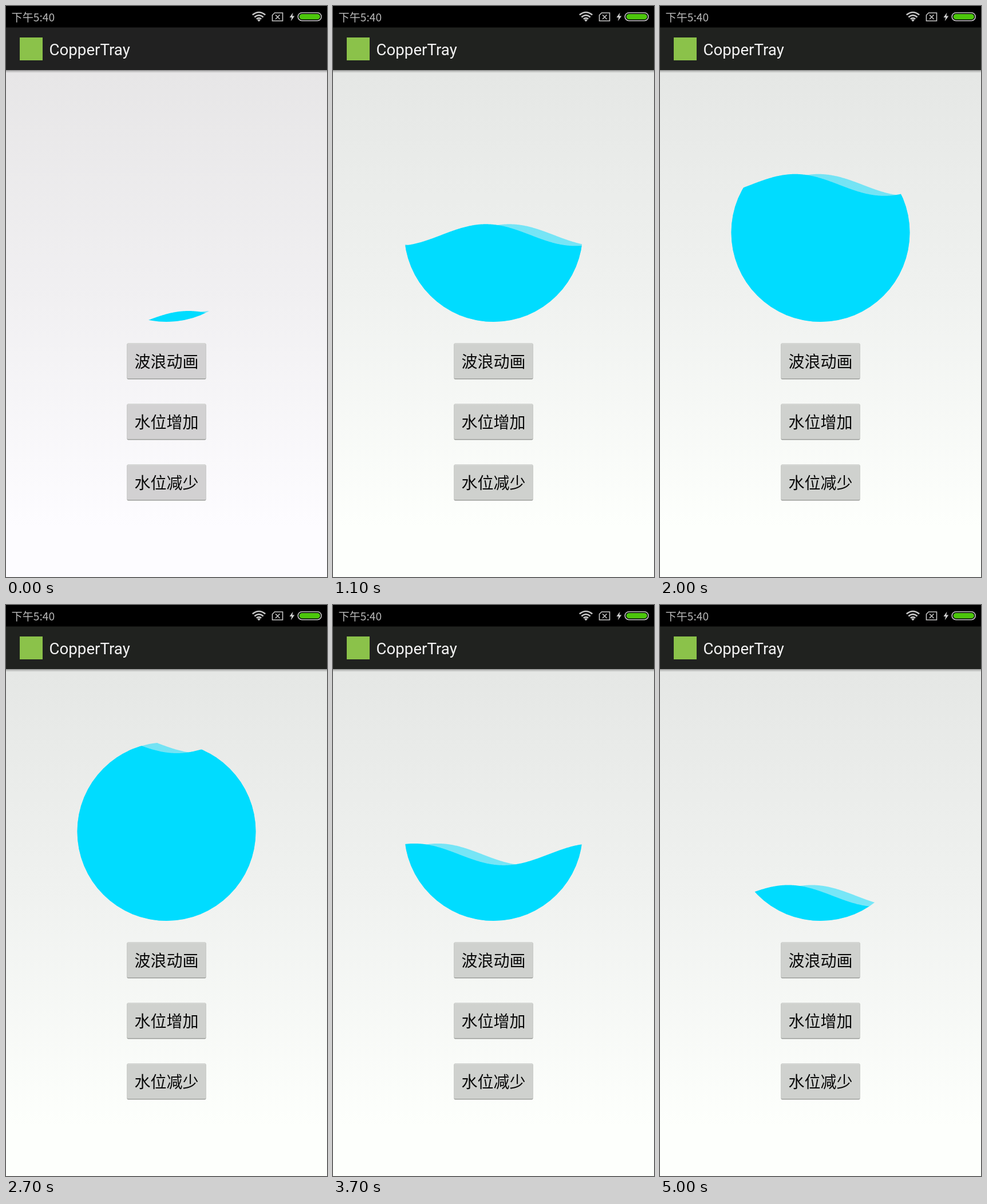
An HTML page that plays this animation: 561 by 998 pixels, repeating every 5.1 s.

```html
<!DOCTYPE html>
<html lang="zh">
<head>
<meta charset="utf-8">
<title>Wave</title>
<style>
  html, body { margin: 0; width: 100%; height: 100%; overflow: hidden; background: #fdfffc; }
  svg { display: block; width: 561px; height: 998px; --top: #e5e7e5; --mid: #f0f2f0; --low: #fdfffc; --bar: #20221f; --face: #cfd1ce; }
  svg.cold { --top: #e7e6e7; --mid: #f1f0f2; --low: #fdfcff; --bar: #212121; --face: #d2d1d2; }
  .top { stop-color: var(--top); }
  .mid { stop-color: var(--mid); }
  .low { stop-color: var(--low); }
  .bar { fill: var(--bar); }
  .face { fill: var(--face); }
  .down .face { fill: #a9cfdc; }
  .label { font: 28px "Noto Sans CJK SC", "Noto Sans CJK", sans-serif; fill: #080808; text-anchor: middle; }
  .clock { font: 19.2px "Noto Sans CJK SC", "Noto Sans CJK", sans-serif; fill: #b9b9b9; }
  .title { font: 27.7px Roboto, sans-serif; fill: #f3f3f3; }
  .line { fill: none; stroke: #c6c6c6; }
</style>
</head>
<body>
<svg id="stage" viewBox="0 0 561 998">
  <defs>
    <linearGradient id="sky" x2="0" y2="1">
      <stop class="top" offset="0"/>
      <stop class="mid" offset=".46"/>
      <stop class="low" offset=".9"/>
    </linearGradient>
    <linearGradient id="shade" x2="0" y2="1">
      <stop offset="0" stop-opacity=".32"/>
      <stop offset="1" stop-opacity="0"/>
    </linearGradient>
    <clipPath id="bowl"><circle cx="280.5" cy="396" r="156"/></clipPath>
  </defs>

  <rect y="112" width="561" height="886" fill="url(#sky)"/>
  <rect y="112" width="561" height="5" fill="url(#shade)"/>
  <rect width="561" height="38" fill="#000"/>
  <rect class="bar" y="37.5" width="561" height="74.5"/>

  <text class="clock" x="9.5" y="27">下午5:40</text>
  <g class="line" stroke-width="2.6">
    <path d="M430.8 15.6Q442 6.4 453.2 15.6M434.3 19.4Q442 13 449.7 19.4M437.8 22.8Q442 19.4 446.2 22.8"/>
    <path d="M469.5 12H483.5V26H465.5V16Z" stroke-width="1.6"/>
    <path d="M471 15.5L478.5 23M478.5 15.5L471 23" stroke-width="1.6"/>
    <rect x="510.2" y="11.7" width="41" height="14" rx="7" stroke-width="1.6"/>
  </g>
  <path d="M442 27.5L439.2 24.4Q442 22.2 444.8 24.4Z" fill="#c6c6c6"/>
  <path d="M501.5 11.5L495.5 20H499.3L497.8 26.5L504.3 17.6H500.4Z" fill="#d0d0d0"/>
  <rect x="512.6" y="14" width="36.4" height="9.5" rx="4.75" fill="#4cc60b"/>

  <rect x="24" y="55" width="40" height="40" fill="#8bc24a"/>
  <text class="title" x="75.5" y="85.5">CopperTray</text>

  <g clip-path="url(#bowl)" fill="#00dcff">
    <path id="back" opacity=".5"/>
    <path id="front"/>
  </g>
  <g id="buttons"></g>
</svg>
<script>
  const LOOP = 5100, STEP = 100;
  const LEFT = 124, RIGHT = 437, BOTTOM = 552, SIZE = 312;
  const AMP = 19, LAG = 41, SPEED = SIZE / 1000;
  const START = 266, REFILL = 4849;
  const $ = id => document.getElementById(id);

  const labels = ['波浪动画', '水位增加', '水位减少'];
  $('buttons').innerHTML = labels.map((text, i) => {
    const y = 589.5 + i * 106;
    return `<g>
      <rect x="211.5" y="${y}" width="138" height="63" rx="2" fill="#9b9d9a"/>
      <rect x="212" y="${y}" width="137" height="61.5" rx="2" fill="#dee0dd"/>
      <rect class="face" x="212" y="${y + 1}" width="137" height="60.5" rx="1.5"/>
      <text class="label" x="280.5" y="${y + 42.5}">${text}</text>
    </g>`;
  }).join('');
  const buttons = [...$('buttons').children];

  // time of each tap and the button it hits
  const taps = [[200, 0], [1600, 1], [3200, 2], [4700, 0]];

  // decelerating progress over one second
  const ease = (t, from) => 1 - (1 - Math.min(1, Math.max(0, (t - from) / 1000))) ** 2;

  const level = t =>
    .5 * ease(t, START) + .5 * ease(t, 1683) - ease(t, 3310) + .5 * ease(t, REFILL);

  const crest = t => t < REFILL
    ? 319 + SPEED * Math.max(0, t - START)
    : 177 + SPEED * (t - REFILL);

  function wave(peak, mid) {
    let d = `M${LEFT} ${BOTTOM + 2}`;
    for (let x = LEFT; x <= RIGHT; x++) {
      const y = mid - AMP * Math.cos((x - peak) / SIZE * 2 * Math.PI);
      d += `L${x} ${y.toFixed(2)}`;
    }
    return d + `V${BOTTOM + 2}Z`;
  }

  function draw(t) {
    const mid = BOTTOM - SIZE * level(t), peak = crest(t);
    $('back').setAttribute('d', wave(peak + LAG, mid));
    $('front').setAttribute('d', wave(peak, mid));
    $('stage').classList.toggle('cold', t < STEP);
    buttons.forEach((b, i) =>
      b.classList.toggle('down', taps.some(([at, n]) => n === i && at === t)));
  }

  const begin = performance.now();
  function tick() {
    const t = (performance.now() - begin) % LOOP;
    draw(Math.floor(t / STEP) * STEP);
    requestAnimationFrame(tick);
  }
  tick();
</script>
</body>
</html>
```
